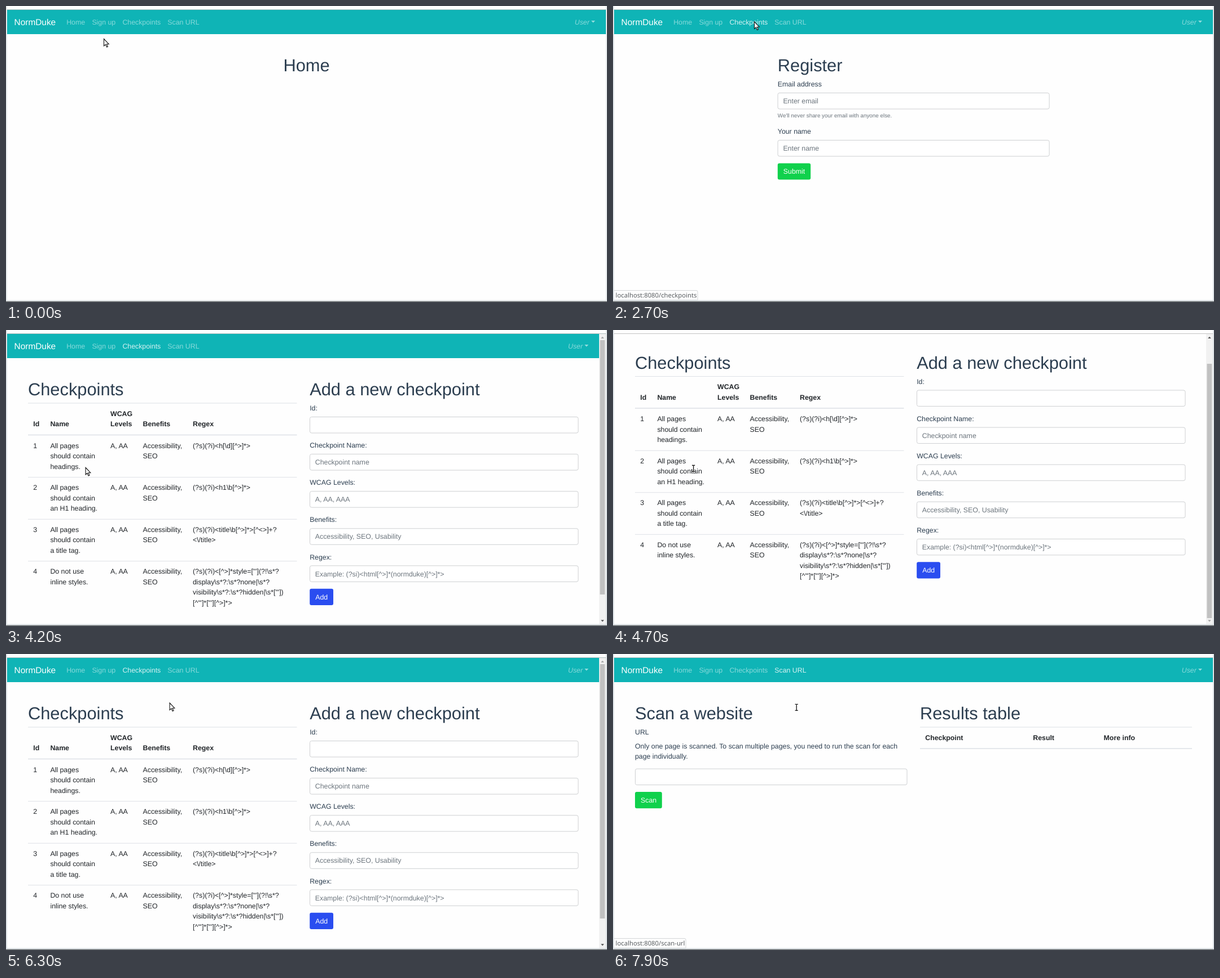
These frames come from a looping animation (1065x526 px, 8 s). An HTML page:

```html
<!DOCTYPE html>
<html lang="en">
<head>
<meta charset="utf-8">
<title>Checkpoint manager</title>
<style>
html, body { margin: 0; width: 100%; height: 100%; overflow: hidden; background: #fefefe; }
svg { display: block; width: 1065px; height: 526px; }
text { font-family: "Liberation Sans", Arial, sans-serif; text-rendering: geometricPrecision; white-space: pre; }
#status text { font-family: "Noto Sans", "Open Sans", sans-serif; }
</style>
</head>
<body>
<svg id="stage" viewBox="0 0 1065 526"></svg>
<script>
const LOOP = 8000, STEP = 100;
const BODY = 12.33, LINE = 18.5;
const INK = '#2c3e50', DARK = '#212529', MUTED = '#6c757d', RULE = '#dee2e6';
const TEAL = '#0fb4b6', GREEN = '#10d14c', BLUE = '#2a4df0';

const esc = s => s.replace(/&/g, '&amp;').replace(/</g, '&lt;').replace(/>/g, '&gt;');
const text = (x, y, s, fill = INK, size = BODY, more = '') =>
  `<text x="${x}" y="${y}" font-size="${size}" fill="${fill}" ${more}>${esc(s)}</text>`;
const lines = (x, y, list, fill = DARK) => list.map((s, i) => text(x, y + i * LINE, s, fill)).join('');
const bold = (x, y, s) => text(x, y, s, DARK, BODY, 'font-weight="700"');
const rect = (x, y, w, h, fill, more = '') =>
  `<rect x="${x}" y="${y}" width="${w}" height="${h}" fill="${fill}" ${more}/>`;
const title = (x, s, more = '') => text(x, 116, s, INK, 30.8, more);
const input = (x, y, w, hint = '') =>
  rect(x + .5, y + .5, w - 1, 28.5, '#fff', 'rx="3" stroke="#ced0d2"') + text(x + 9.8, y + 19.1, hint, MUTED);
const button = (x, y, w, s, fill) => rect(x, y, w, 29.2, fill, 'rx="3"') + text(x + 10, y + 18.8, s, '#fff');
const group = (id, body) => `<g id="${id}">${body}</g>`;

const home = title(532.5, 'Home', 'text-anchor="middle"');

const register = title(291.8, 'Register') +
  text(291.8, 143.1, 'Email address') + input(291.6, 154, 482, 'Enter email') +
  text(291.8, 197.5, "We'll never share your email with anyone else.", MUTED, 9.86) +
  text(291.8, 226.9, 'Your name') + input(291.6, 238, 482, 'Enter name') +
  button(291.8, 279.4, 58.4, 'Submit', GREEN);

const rules = [
  [['All pages', 'should contain', 'headings.'], ['(?s)(?i)<h[\\d][^>]*>']],
  [['All pages', 'should contain', 'an H1 heading.'], ['(?s)(?i)<h1\\b[^>]*>']],
  [['All pages', 'should contain', 'a title tag.'], ['(?s)(?i)<title\\b[^>]*>[^<>]+?', '<\\/title>']],
  [['Do not use', 'inline styles.'], ['(?s)(?i)<[^>]*style=["\'](?!\\s*?', 'display\\s*?:\\s*?none|\\s*?',
    'visibility\\s*?:\\s*?hidden|\\s*["\'])', '[^"\']*["\'][^>]*>']]
];
const fields = [
  ['Id:', ''], ['Checkpoint Name:', 'Checkpoint name'], ['WCAG Levels:', 'A, AA, AAA'],
  ['Benefits:', 'Accessibility, SEO, Usability'], ['Regex:', 'Example: (?si)<html[^>]*(normduke)[^>]*>']
];
const ruleRow = ([name, regex], i) => {
  const y = 209.8 + i * 74.5;
  return (i ? rect(39, y - 23, 476.5, 1, RULE) : '') + text(48.3, y, String(i + 1), DARK) +
    lines(78.4, y, name) + text(185, y, 'A, AA', DARK) +
    lines(242.5, y, ['Accessibility,', 'SEO']) + lines(331, y, regex);
};
const checks = title(39, 'Checkpoints') + rect(39, 129.5, 476.5, 1, RULE) +
  bold(185, 152.9, 'WCAG') + bold(48.3, 171.4, 'Id') + bold(78.4, 171.4, 'Name') +
  bold(185, 171.4, 'Levels') + bold(242.5, 171.4, 'Benefits') + bold(331, 171.4, 'Regex') +
  rect(39, 185.7, 476.5, 1.6, RULE) + rules.map(ruleRow).join('') +
  title(538.2, 'Add a new checkpoint') +
  fields.map(([label, hint], i) =>
    text(538.2, 143.1 + i * 66.1, label) + input(538, 154 + i * 66.1, 476.5, hint)).join('') +
  button(538.2, 459.8, 41.8, 'Add', BLUE);

const scan = title(39, 'Scan a website') + text(39, 143.1, 'URL') +
  lines(39, 167.6, ['Only one page is scanned. To scan multiple pages, you need to run the scan for each',
    'page individually.'], INK) +
  input(39, 203.6, 482.5) + button(39, 245, 47.8, 'Scan', GREEN) +
  title(544, 'Results table') + rect(544, 129.5, 482, 1, RULE) +
  bold(553.3, 152.9, 'Checkpoint') + bold(744.3, 152.9, 'Result') + bold(869.6, 152.9, 'More info') +
  rect(544, 167.2, 482, 1.6, RULE);

const link = (id, x, s) => text(x, 32.6, s, '#fff', BODY, `id="${id}" fill-opacity=".5"`);
const nav = rect(2, 6.6, 1061, 43.4, TEAL) + text(14.6, 34, 'NormDuke', '#fff', 15.4) +
  link('navHome', 107.2, 'Home') + link('navSign', 152.4, 'Sign up') +
  link('navChecks', 206.4, 'Checkpoints') + link('navScan', 286.3, 'Scan URL') +
  group('user', text(1007.8, 32.6, 'User', '#fff', BODY, 'font-style="italic" fill-opacity=".5"') +
    '<path d="M1037 26H1044L1040.5 29.8Z" fill="#fff" fill-opacity=".55"/>');

const scrollbar = rect(1051, 7, 12, 516, '#f1f1f1') +
  rect(1052.6, 18, 8.6, 452, '#c1c1c1', 'id="thumb"') +
  '<path id="up" d="M1054.2 15H1059.8L1057 11.8Z"/><path id="down" d="M1054.2 515.2H1059.8L1057 518.4Z"/>';

const status = '<path id="statusBox" fill="#fdfdfd" stroke="#d3d6d8"/>' +
  text(4.6, 518, '', '#5c6063', 11.28, 'id="statusText"');

const cursors =
  '<path id="arrow" d="M.5 .5V13L3.4 10.4L5.4 15L7.4 14.1L5.4 9.7H9.2Z" fill="#fff" stroke="#111" stroke-width="1.1"/>' +
  '<path id="hand" d="M-1 .5Q.2-1.3 1.3 .5V5L5.5 5.8Q7.4 6.4 7 8.5L5.8 13H-1.8L-5 8Q-4.4 6.2-2.4 7.6L-1 9Z" fill="#fff" stroke="#111"/>' +
  '<g id="beam" fill="none"><path d="M-.4-3.5H4.4M2-3.5V7.5M-.4 7.5H4.4" stroke="#fff" stroke-width="3"/>' +
  '<path d="M-.6-3.5H1.2L2-3L2.8-3.5H4.6M2-3V7M-.6 7.5H1.2L2 7L2.8 7.5H4.6" stroke="#111" stroke-width="1.3"/></g>';

document.getElementById('stage').innerHTML =
  '<clipPath id="view"><rect x="2" y="6" width="1061" height="517"/></clipPath>' +
  rect(0, 0, 1065, 526, '#fefefe') +
  '<g clip-path="url(#view)">' +
  group('page', nav + group('home', home) + group('register', register) +
    group('checks', checks) + group('scan', scan)) +
  group('bar', scrollbar) + rect(2, 6, 1061, .8, '#b4b4b4') + '</g>' +
  group('status', status) +
  group('frame', rect(0, 0, 2, 525, '#dde2e5') + rect(1063, 0, 2, 525, '#dde2e5') +
    rect(0, 522.6, 1065, 2.2, '#dde2e5')) + rect(0, 524.8, 1065, 1.2, '#55595b') +
  group('cursor', cursors);

const el = id => document.getElementById(id);
const set = (id, name, value) => el(id).setAttribute(name, value);
const show = (id, on) => set(id, 'display', on ? 'inline' : 'none');

// Each key is [time, value]; the value holds until the next key.
const at = (keys, t) => keys.reduce((v, k) => t >= k[0] ? k[1] : v, keys[0][1]);

const pages = [[0, 'home'], [700, 'register'], [2800, 'checks'], [7800, 'scan']];
const shapes = [[0, 'arrow'], [300, 'hand'], [700, 'arrow'], [1000, 'hand'], [1800, 'arrow'], [2000, 'hand'],
  [2500, 'arrow'], [4600, 'beam'], [5600, 'arrow'], [6500, 'hand'], [7500, 'arrow'], [7800, 'beam']];
shapes.splice(2, 2);
const scrolls = [[0, 0], [4600, 25], [4700, 47.5], [5300, 27], [5400, 4.6], [5600, 0]];
const hints = [[0, ''], [500, 'register'], [1900, 'checkpoints'], [3300, ''], [6700, 'scan-url']];
const path = [[0, 173, 58], [300, 174, 27], [1700, 174, 27], [2000, 250, 27.5], [3000, 250, 27.5],
  [3300, 400, 70], [3600, 534, 138], [3700, 534, 138], [3800, 425, 186], [4000, 425, 186],
  [4200, 140.6, 244], [5900, 140.6, 244], [6100, 206.6, 170], [6200, 206.6, 170],
  [6300, 289.6, 86.5], [6600, 330, 27], [7700, 330, 27], [7800, 323.2, 92.8]];

function pointer(t) {
  const i = path.findIndex(p => p[0] > t);
  if (i < 0) return path[path.length - 1].slice(1);
  const a = path[i - 1], b = path[i], u = (t - a[0]) / (b[0] - a[0]);
  return [a[1] + (b[1] - a[1]) * u, a[2] + (b[2] - a[2]) * u];
}

function draw(time) {
  const t = Math.floor(time / STEP) * STEP;
  const page = at(pages, t), scroll = at(scrolls, t), long = page === 'checks';

  for (const [, id] of pages) show(id, id === page);
  set('page', 'transform', `translate(0 ${-scroll})`);
  set('user', 'transform', `translate(${long ? -11.8 : 0} 0)`);
  show('bar', long);
  set('thumb', 'y', 18 + scroll * .885);
  set('up', 'fill', scroll > 0 ? '#505050' : '#a3a3a3');
  set('down', 'fill', scroll < 47 ? '#505050' : '#a3a3a3');

  const glow = (id, from, to) => set(id, 'fill-opacity', t >= from && t < to ? .83 : .5);
  glow('navSign', 300, 2700);
  glow('navChecks', 2000, 7500);
  glow('navScan', 6500, LOOP);

  const hint = at(hints, t), label = el('statusText');
  show('status', hint);
  if (hint) {
    label.textContent = 'localhost:8080/' + hint;
    label.setAttribute('fill-opacity', t < 1000 ? .8 : 1);
    const right = 6.2 + label.getComputedTextLength();
    set('statusBox', 'd', `M1.5 505.5H${right - 2}Q${right} 505.5 ${right} 508V522.6H1.5Z`);
  }
  set('frame', 'opacity', t < 100 ? .75 : 1);

  const shape = at(shapes, t);
  for (const id of ['arrow', 'hand', 'beam']) show(id, id === shape);
  set('cursor', 'transform', `translate(${pointer(t)})`);
}

const start = performance.now();
function tick() {
  draw((performance.now() - start) % LOOP);
  requestAnimationFrame(tick);
}
tick();
</script>
</body>
</html>
```
